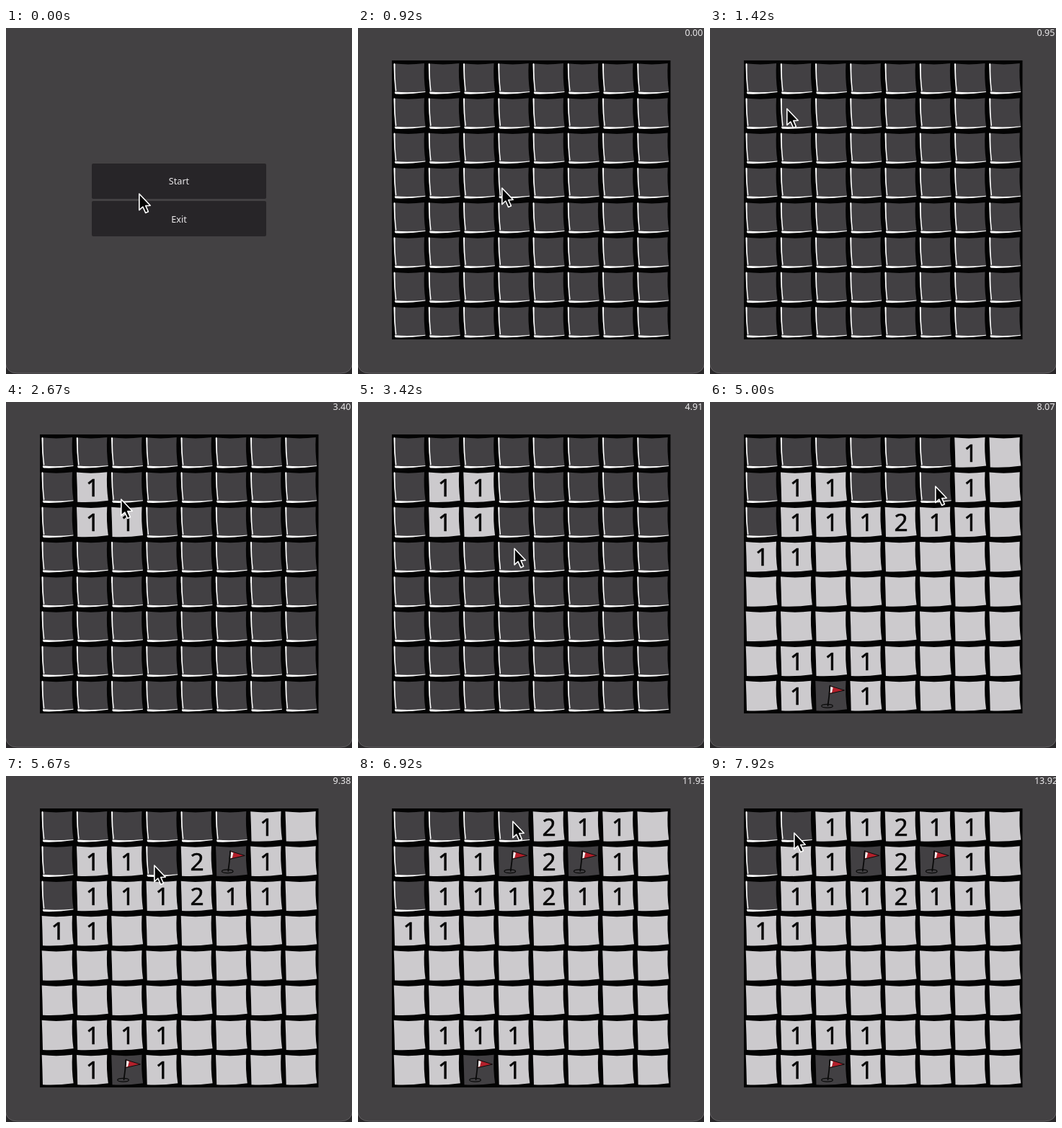
Write an HTML page that moves like this. It is 480x480 px and loops after 8 s.

```html
<!DOCTYPE html>
<html lang="en">
<head>
<meta charset="utf-8">
<title>Mine field</title>
<style>
  html, body { margin: 0; width: 100%; height: 100%; overflow: hidden; background: #2a282a; }
  svg { display: block; width: 100vw; height: 100vh; }
  text { font-family: "Noto Sans", "Open Sans", sans-serif; text-anchor: middle; }
  .ui { font-size: 12.6px; fill: #ebe9eb; }
  .button { fill: #272528; }
  .face { fill: #424043; }
  .shine { fill: #fff; }
  .mark { visibility: hidden; }
  .num { font-size: 33.5px; font-weight: 500; fill: #060606; stroke: #060606; stroke-width: .5; }
  .open .face { fill: #cccacd; }
  .open .shine, .flag .shine { visibility: hidden; }
  .open .mark, .flag .mark { visibility: visible; }
</style>
</head>
<body>
<svg viewBox="0 0 480 480">
  <defs>
    <path id="face" d="M2.7 4.3Q24 6.6 45 4Q43.8 24 46.6 43.6Q25 46.6 4 45.6Q3.6 24 2.7 4.3Z"/>
    <path id="shine" d="M2.5 5.2Q3.4 3 4.6 5.2Q4.2 25 6.4 42L5 43Q2.6 25 2.5 5.2Z
      M4.5 43.6Q25 45 46.4 42.9L46.4 44.1Q25 47.2 5.2 46.5Q3 45.4 4.5 43.6Z"/>
    <g id="flag" stroke-linecap="round" stroke-linejoin="round">
      <ellipse cx="19" cy="39" rx="7.8" ry="2.3" fill="none" stroke="#0a0a0a" stroke-width="1.3"/>
      <path d="M23 11L43 17.2L22.2 22Z" fill="#b3202b" stroke="#0a0a0a"/>
      <path d="M23.6 12L27.2 13.2L25.6 20.2L22.8 21Z" fill="#f2eeee"/>
      <path d="M23 11Q22 25 20 38.5" fill="none" stroke="#0a0a0a" stroke-width="1.8"/>
    </g>
  </defs>

  <path d="M-1 -1H481V463Q480 479 464 479H16Q0 479 -1 463Z" fill="#434143" stroke="#6c6a6c" stroke-width=".8"/>

  <g id="menu">
    <rect class="button" x="119" y="188" width="242" height="49" rx="2"/>
    <rect class="button" x="119" y="240" width="242" height="49" rx="2"/>
    <text class="ui" x="240" y="217">Start</text>
    <text class="ui" x="240" y="269.5">Exit</text>
  </g>

  <g id="game">
    <rect x="47" y="45" width="386.5" height="387" fill="#030303"/>
    <g id="board"></g>
    <text class="ui" id="clock" x="466" y="10.5"></text>
  </g>

  <path id="cursor" d="M.8 1V23.6L5.8 19L9.6 27.4L13.4 25.7L9.8 17.6L16.2 17.2Z"
    fill="#050505" stroke="#fff" stroke-width="1.6" stroke-linejoin="round"/>
</svg>
<script>
const LOOP = 8000, STEP = 1000 / 12, GAME_AT = 917, FLOOD_AT = 3500, PITCH = 48.25;
const $ = id => document.getElementById(id);

// Digits are opened cells, F a flag, # stays covered.
const board = [
  '##112110', '#11F2F10', '#1112110', '11000000',
  '00000000', '00000000', '01110000', '01F10000'
];

// Cells played one by one, keyed by column and row; the rest open at once.
const played = {
  '11': 1583, '12': 2000, '22': 2417, '21': 2917, '27': 4500, '51': 5083,
  '41': 5417, '31': 5833, '50': 6250, '40': 6583, '30': 7083, '20': 7500
};

// Time, x, y of the pointer tip.
const pointer = [
  [0, 184, 229], [150, 184, 229], [160, 198, 219], [333, 198, 219], [500, 199, 221],
  [917, 199, 221], [1417, 106, 111], [1667, 108, 114], [2000, 116, 162], [2167, 120, 166],
  [2417, 160, 164], [2667, 159, 134], [2917, 162, 114], [3083, 165, 116],
  [3500, 222, 212], [3667, 220, 222], [4083, 172, 417], [4333, 167, 399], [4583, 167, 399],
  [5000, 312, 116], [5167, 309, 116], [5417, 260, 118], [5667, 205, 123], [5917, 207, 116],
  [6250, 308, 68], [6583, 262, 66], [6917, 214, 62], [7167, 211, 65],
  [7500, 166, 70], [7583, 163, 71], [7917, 116, 78], [8000, 114, 78]
];

const seconds = [
  [917, 0], [1417, .95], [2667, 3.4], [4333, 6.75], [5667, 9.38],
  [6917, 11.93], [7917, 13.92], [8000, 14.09]
];

const smooth = p => p * p * (3 - 2 * p);

function sample(keys, t, ease = p => p) {
  let i = 1;
  while (i < keys.length - 1 && keys[i][0] <= t) i++;
  const a = keys[i - 1], b = keys[i];
  const p = ease(Math.min(1, Math.max(0, (t - a[0]) / (b[0] - a[0]))));
  return a.slice(1).map((v, k) => v + (b[k + 1] - v) * p);
}

const cells = [];
board.forEach((row, r) => [...row].forEach((value, c) => {
  const g = document.createElementNS('http://www.w3.org/2000/svg', 'g');
  g.setAttribute('transform', `translate(${47 + c * PITCH} ${45 + r * PITCH})`);
  let mark = '';
  if (value === 'F') mark = '<use class="mark" href="#flag"/>';
  else if (value > 0) mark = `<text class="mark num" x="25" y="37.6">${value}</text>`;
  g.innerHTML = '<use class="face" href="#face"/><use class="shine" href="#shine"/>' + mark;
  $('board').append(g);
  cells.push({
    g,
    at: value === '#' ? Infinity : played[`${c}${r}`] || FLOOD_AT,
    state: value === 'F' ? 'flag' : 'open'
  });
}));

function draw(now) {
  const t = Math.floor((now % LOOP + 4) / STEP) * STEP + 1;
  const playing = t >= GAME_AT;
  $('menu').style.display = playing ? 'none' : '';
  $('game').style.display = playing ? '' : 'none';
  for (const { g, at, state } of cells) g.setAttribute('class', t >= at ? state : '');
  $('clock').textContent = sample(seconds, t - 1)[0].toFixed(2);
  const [x, y] = sample(pointer, t, smooth);
  $('cursor').setAttribute('transform', `translate(${x.toFixed(2)} ${y.toFixed(2)})`);
}

const start = performance.now();
function tick() {
  draw(performance.now() - start);
  requestAnimationFrame(tick);
}
tick();
</script>
</body>
</html>
```
